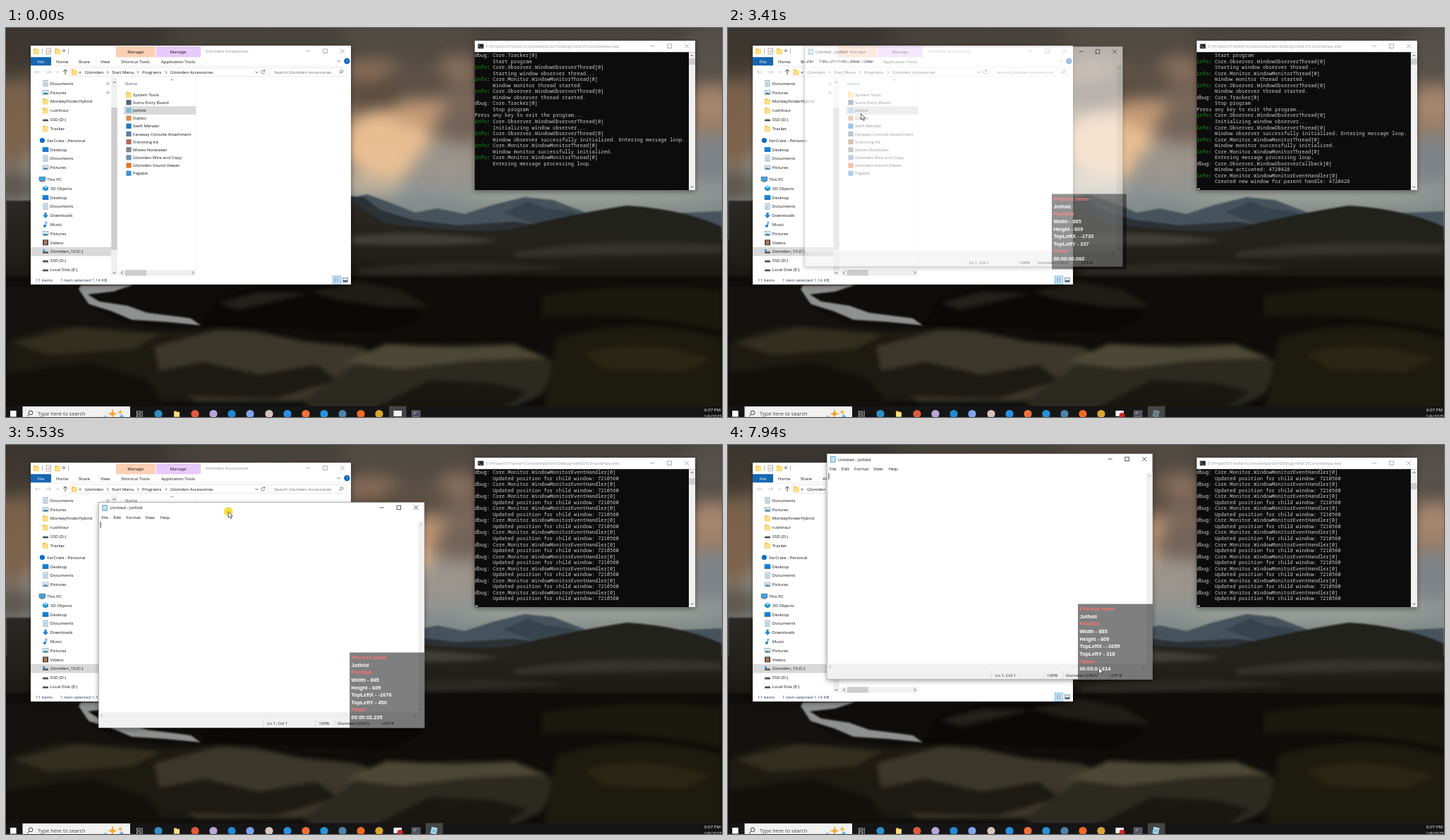
Animation of 1015 by 552 pixels, one loop 8000 ms. Source, as an HTML page:

```html
<!DOCTYPE html>
<html lang="en">
<head>
<meta charset="utf-8">
<title>Window tracker</title>
<style>
html, body { margin: 0; width: 100%; height: 100%; overflow: hidden; background: #0e0d0a; }
svg { display: block; width: 1015px; height: 552px; }
filter { color-interpolation-filters: sRGB; }
text { font-family: "Open Sans", "Noto Sans", sans-serif; white-space: pre; }
.mono text { font-family: "Noto Sans Mono", "DejaVu Sans Mono", monospace; }
.tag text { font-family: "Liberation Sans", Arial, sans-serif; font-weight: bold; }
</style>
</head>
<body>
<svg id="stage" viewBox="0 0 1015 552" xmlns="http://www.w3.org/2000/svg"></svg>
<script>
const LOOP = 8000, PX = 1.917;
const ROW_TOP = 94.5, ROW_STEP = 11.17, SELECTED = 2;

// Drawing helpers
const rect = (x, y, w, h, fill, more = '') =>
  `<rect x="${x}" y="${y}" width="${w}" height="${h}" fill="${fill}" ${more}/>`;
const disc = (x, y, r, fill, more = '') => `<circle cx="${x}" cy="${y}" r="${r}" fill="${fill}" ${more}/>`;
const shape = (d, fill, more = '') => `<path d="${d}" fill="${fill}" ${more}/>`;
const line = (d, stroke, width = .7, more = '') =>
  shape(d, 'none', `stroke="${stroke}" stroke-width="${width}" ${more}`);
const text = (x, y, str, fill = '#111', size = 6.1, more = '') =>
  `<text x="${x}" y="${(y + size * .36).toFixed(2)}" font-size="${size}" fill="${fill}" ${more}>${str}</text>`;
const mid = (x, y, str, fill, size) => text(x, y, str, fill, size, 'text-anchor="middle"');
const arrow = (x, y, turn, color = '#444') =>
  line('M-2 1L0 -1L2 1', color, .9, `transform="translate(${x} ${y}) rotate(${turn})"`);
const buttons = (x, y, color) =>
  line(`M${x - 3} ${y}h6`, color) +
  rect(x + 21.2, y - 2.8, 5.6, 5.6, 'none', `stroke="${color}" stroke-width=".7"`) +
  line(`M${x + 45.5} ${y - 3}l6 6m0 -6l-6 6`, color);

const icons = {
  folder: (x, y) => shape(`M${x - 4} ${y - 4}h3.5l1 1.2h3.5v7h-8z`, '#f3c550') +
    rect(x - 3.2, y - 2, 7.2, 5.8, '#ffdf85'),
  doc: (x, y) => rect(x - 3, y - 4, 6, 8, '#fff', 'stroke="#6f8799" stroke-width=".7"') +
    line(`M${x - 1.8} ${y - 1.5}h3.6m-3.6 1.8h3.6m-3.6 1.8h3.6`, '#3b8fc9'),
  pic: (x, y) => rect(x - 4, y - 3, 8, 6, '#d8ecf7', 'stroke="#7e94a3" stroke-width=".6"') +
    shape(`M${x - 3.6} ${y + 2.6}l2.6 -3 1.6 1.5 1.5 -1 1.5 2.5z`, '#3a7fa5'),
  disk: (x, y) => rect(x - 4, y, 8, 2.6, '#4c5054', 'rx=".6"') + rect(x - 3, y - .9, 6, 1, '#a9adb0'),
  osdisk: (x, y) => icons.disk(x, y) + rect(x - 4, y - 3, 3, 2.6, '#1e9be6'),
  desk: (x, y) => rect(x - 4.3, y - 3.2, 8.6, 6.4, '#1683d8') + rect(x - 4.3, y + 2, 8.6, 1.2, '#0b5aa5'),
  pc: (x, y) => rect(x - 4.3, y - 3.5, 8.6, 5.5, '#3aa5e8', 'stroke="#51697a" stroke-width=".7"') +
    rect(x - 3, y + 2.6, 6, 1.2, '#51697a'),
  cube: (x, y) => shape(`M${x - 4} ${y - 2}l4 -2 4 2v4l-4 2 -4 -2z`, '#2694cf') +
    shape(`M${x - 4} ${y - 2}l4 2 4 -2 -4 -2z`, '#8fd4f0'),
  down: (x, y) => shape(`M${x - 1.6} ${y - 4}h3.2v3.6h2.6l-4.2 4.4 -4.2 -4.4h2.6z`, '#1f87d8'),
  music: (x, y) => disc(x - 1.2, y + 2.2, 1.9, '#1d7fd1') + line(`M${x + .4} ${y + 2}v-6l2.4 2.4`, '#1d7fd1', 1),
  film: (x, y) => rect(x - 4, y - 4, 8, 8, '#3f4348') + rect(x - 2.4, y - 3, 4.8, 6, '#b3764f'),
  cloud: (x, y) => disc(x, y, 3.6, '#0f6cc4'),
};

// Landscape in broad soft tones
function landscape() {
  const blur = (id, body) => `<g filter="url(#${id})">${body}</g>`;
  const blob = (x, y, w, h, c) => `<ellipse cx="${x}" cy="${y}" rx="${w}" ry="${h}" fill="${c}" opacity=".9"/>`;
  const clouds = blob(110, 6, 170, 34, '#393530') + blob(370, 6, 150, 26, '#47423b') + blob(570, 10, 100, 30, '#544c43') +
    blob(640, 60, 30, 22, '#8a715c') + blob(520, 60, 40, 16, '#8d7159') + blob(520, 95, 40, 20, '#58493c') +
    blob(580, 75, 50, 18, '#594d42') + blob(540, 165, 62, 48, '#f2c595') + blob(590, 122, 46, 18, '#c79c77') +
    blob(645, 135, 34, 26, '#6f6158') + blob(625, 195, 50, 30, '#9c968e') + blob(520, 222, 45, 14, '#c5b59c') +
    blob(1000, 30, 42, 40, '#56514b') + blob(1000, 110, 30, 28, '#a98973') + blob(1000, 185, 32, 34, '#7c8288') +
    blob(820, 238, 180, 10, '#a0a69b') + blob(8, 40, 36, 34, '#40382f') + blob(8, 135, 36, 62, '#7b6049') +
    blob(8, 225, 36, 24, '#5a5148');
  return rect(0, 0, 1015, 300, 'url(#sky)') + blur('haze', clouds) + blur('soft',
    shape('M480 243L512 236 545 248 580 262 612 256 650 264 690 251 735 240 775 244 822 262 870 266 1015 260V310H480Z', '#46535c') +
    shape('M480 238L508 240 530 258 575 272 640 280 720 275 800 285V320H480Z', '#2b3135') +
    shape('M705 262L740 246 765 256 800 260 850 276 760 282Z', '#38444d') +
    shape('M690 292Q800 264 880 252Q960 257 1015 282V370H690Z', '#22221d') +
    shape('M0 245H488L535 276Q630 292 720 286L1015 304V380H0Z', 'url(#plain)') +
    rect(0, 352, 1015, 200, '#0e0d0a')) +
  blur('mist',
    shape('M490 296Q580 284 700 302Q620 312 490 306Z', '#403f37') +
    shape('M720 318Q850 296 1015 308V320Q860 322 720 326Z', '#34332a') +
    shape('M500 342Q640 322 800 340Q650 352 500 350Z', '#2a2922') +
    shape('M760 380Q880 360 1015 372V430Q880 400 760 410Z', '#1b190d')) +
  blur('soft',
    shape('M106 365L182 364 152 374 116 378 132 388 172 394 200 404 262 412 276 422 226 417 178 414 150 402 118 392 100 376Z', '#8f9190') +
    shape('M0 366H100L120 396 160 418 240 426 0 442Z', '#13120f') +
    shape('M276 422L300 384 370 366 470 362 560 384 590 410 540 432 400 426Z', '#0a0907')) +
  blur('mist',
    shape('M430 374L500 360 560 372 600 396 540 396 470 386Z', '#1f1d15') +
    shape('M300 390L360 374 430 376 390 386 330 400Z', '#24211a') +
    shape('M0 444L70 422 200 430 320 426 430 448 400 490 280 530 90 530 0 552Z', '#1d1a12') +
    shape('M210 452L300 428 352 430 420 444 500 452 560 478 520 515 410 530 270 530 220 500Z', '#3c372a') +
    shape('M10 446L100 424 220 434 180 456 60 464Z', '#332e1e') +
    shape('M200 490L280 474 360 492 440 478 470 500 380 526 250 522Z', '#1c1a13') +
    shape('M420 530L500 474 600 450 720 448 782 476 760 520 690 552H450Z', '#2c2a20') +
    shape('M480 474L540 448 640 454 720 450 768 468 660 472 560 484Z', '#4d4835') +
    shape('M520 540L600 500 690 504 740 516 690 552H530Z', '#191710') +
    shape('M780 440Q900 404 1015 440V552H760Z', '#1d1a0e') +
    shape('M820 462Q900 436 1000 470L960 488 850 484Z', '#2a2613') +
    shape('M0 490L120 474 200 500 240 552H0Z', '#12100b'));
}

function sidebar() {
  const entry = (y, kind, label, x = 56) => icons[kind](x, y) + text(x + 6.8, y, label);
  const rows = [
    [78.5, 'doc', 'Documents'], [91.3, 'pic', 'Pictures'], [104, 'folder', 'MonkeyFinderHybrid'],
    [117, 'folder', 'rushhour'], [129.7, 'disk', 'SSD (D:)'], [142.5, 'folder', 'Tracker'],
    [159.5, 'cloud', 'FarCrate - Personal', 51.4], [172.3, 'desk', 'Desktop'], [185, 'doc', 'Documents'],
    [198, 'pic', 'Pictures'], [214.7, 'pc', 'This PC', 51.4], [227.5, 'cube', '3D Objects'],
    [240.3, 'desk', 'Desktop'], [253.2, 'doc', 'Documents'], [266, 'down', 'Downloads'],
    [278.8, 'music', 'Music'], [291.6, 'pic', 'Pictures'], [304.4, 'film', 'Videos'],
    [317.2, 'osdisk', 'Glomden_10 (C:)'], [330, 'disk', 'SSD (D:)'], [342.7, 'disk', 'Local Disk (E:)'],
  ];
  const pin = y => line(`M142 ${y + 2.5}l2 -2m-1.5 -1.5l3 3m-1 -4l2 2l-2 1.5`, '#777');
  return rect(35, 311, 114, 12.6, '#d9d9d9') + rows.map(r => entry(...r)).join('') + pin(78.5) + pin(91.3) +
    rect(149.3, 71, 8.4, 280, '#f0f0f0') + rect(149.3, 113, 8.4, 202, '#cdcdcd') +
    arrow(153.5, 77, 0) + arrow(153.5, 347.5, 180);
}

function fileList() {
  const files = [['System Tools'], ['Sums Entry Board', '#54697c'], ['Jotfold', '#7cb9d8'], ['Dabbo', '#d98a4a'],
    ['Swift Mender', '#1878c8'], ['Faraway Console Attachment', '#5f7f9c'], ['Trimming Kit', '#b4685c'],
    ['Moves Notetaker', '#7a8590'], ['Glomden Wire and Copy', '#6f8fae'], ['Glomden Sound Viewer', '#e2762c'],
    ['PageJot', '#3f8fd0']];
  return files.map(([name, color], i) => {
    const y = ROW_TOP + i * ROW_STEP;
    return (color ? rect(170.4, y - 3.6, 7.2, 7.2, color) : icons.folder(174, y)) + text(180, y, name);
  }).join('');
}

function explorer() {
  const crumbs = [[112, 'Glomden'], [150, 'Start Menu'], [193, 'Programs'], [233, 'Glomden Accessories']];
  return rect(35, 25, 454, 339, '#fff', 'filter="url(#shadow)"') +
    icons.folder(43, 33) + line('M51.5 29v8M88.5 29v8', '#888', .6) +
    rect(57, 29, 6.6, 8, '#fff', 'stroke="#777" stroke-width=".6"') + line('M58.5 33l1.5 1.5 2.6 -3', '#d3552b', .9) +
    icons.folder(73, 33) + arrow(82, 33, 180) + line('M80 31h4', '#444') +
    rect(156, 26, 55.5, 15.5, '#fbcfb3') + rect(212.5, 26, 63.5, 15.5, '#e8cafa') +
    mid(183.7, 34, 'Manage') + mid(244, 34, 'Manage') +
    text(283, 33, 'Glomden Accessories', '#8c8c8c', 6.1, 'id="exTitle"') + buttons(428.5, 32.7, '#888') +
    rect(35, 41.3, 29, 12, '#1865b0') + mid(49.5, 47.3, 'File', '#fff') +
    [[79.7, 'Home'], [110.8, 'Share'], [140.7, 'View'], [183.5, 'Shortcut Tools'], [244, 'Application Tools']]
      .map(([x, s]) => mid(x, 47.3, s)).join('') +
    arrow(472, 47, 180, '#777') + disc(483.3, 47, 4.2, '#0f67b8') + mid(483.3, 47, '?', '#fff', 6) +
    line('M35 53.8H489', '#e2e2e2', .6) +
    line('M48.5 62.5h-7m2.8 -2.8l-2.8 2.8 2.8 2.8M56.5 62.5h7m-2.8 -2.8l2.8 2.8 -2.8 2.8', '#bbb', .8) +
    arrow(73, 62.5, 180, '#aaa') + line('M84 66v-7m-2.8 2.8l2.8 -2.8 2.8 2.8', '#333', .9) +
    rect(91, 56.5, 280.5, 12.3, '#fff', 'stroke="#d9d9d9" stroke-width=".6"') + icons.folder(97, 62.5) +
    text(103, 62, '«', '#333', 8) + crumbs.map(([x, s]) => text(x, 62.7, s)).join('') +
    [144, 187, 227].map(x => arrow(x, 62.8, 90, '#555')).join('') + arrow(355.5, 62.8, 180) +
    line('M366.6 61a2.6 2.6 0 1 0 .3 2.4M366.8 59v2.2h-2.2', '#444') +
    rect(375, 56.5, 107.5, 12.3, '#fff', 'stroke="#d9d9d9" stroke-width=".6"') +
    text(380, 62.7, 'Search Glomden Accessories', '#707070') +
    disc(475.8, 61.5, 2, 'none', 'stroke="#555" stroke-width=".7"') + line('M474.3 63l-2.3 2.3', '#555') +
    sidebar() + line('M269.3 71V343', '#ececec', .6) + text(169, 79, 'Name', '#43607f') + arrow(235.3, 73.5, 0, '#777') +
    '<rect id="hover" x="167" width="102" height="11.2" fill="#e5f3ff"/>' +
    `<rect id="selected" x="167.3" y="${ROW_TOP + SELECTED * ROW_STEP - 5.6}" width="101.6" height="11.2" stroke-width=".6"/>` +
    fileList() + rect(160, 343.3, 109.3, 8.2, '#f0f0f0') + rect(169, 343.3, 30, 8.2, '#cdcdcd') +
    arrow(164.5, 347.4, -90) + arrow(265, 347.4, 90) +
    text(42, 358, '11 items', '#1e395b') + text(77, 358, '1 item selected', '#1e395b') + text(122, 358, '1.14 KB', '#1e395b') +
    rect(463.3, 352, 11.5, 11, '#cce8ff', 'stroke="#4ba3e0" stroke-width=".7"') +
    line('M465.5 355h7m-7 2.4h7m-7 2.4h7', '#667', .8, 'stroke-dasharray="2.5 .8"') +
    rect(477.6, 354.5, 7, 6, '#d5e7f4', 'stroke="#667" stroke-width=".6"') + rect(478, 358, 6.2, 2.2, '#4e606e');
}

const consoleWindow = () => rect(664.5, 18, 312.5, 212, '#0c0c0c', 'filter="url(#shadow)"') +
  rect(664.5, 18, 312.5, 16.2, '#fff') + rect(669, 22.7, 8, 6.4, '#222', 'stroke="#999" stroke-width=".6"') +
  line('M670.3 24.5l1.4 1.2 -1.4 1.2m2.2 .6h2', '#ddd', .6) +
  text(680, 26, 'E:\\Projects\\Tracker\\ConsoleApp\\bin\\Debug\\net8.0\\ConsoleApp.exe', '#999', 6.1) +
  buttons(916.5, 25.7, '#888') + rect(968, 34.2, 9, 195.8, '#f0f0f0') +
  arrow(972.5, 39, 0) + arrow(972.5, 225.5, 180) +
  '<rect id="thumb" x="968.3" width="8.4" height="9" fill="#cdcdcd"/><g id="log" class="mono"></g>';

const editor = () => rect(0, 0, 462, 320, '#fff', 'filter="url(#shadow)"') +
  rect(.2, .2, 461.6, 319.6, '#fff', 'stroke="#777" stroke-width=".5"') +
  rect(5.5, 4, 7, 8, '#a9d8ee', 'stroke="#5b8da8" stroke-width=".6"') + line('M7 6.5h4m-4 2h4', '#fff') +
  text(16, 8, 'Untitled - Jotfold') + buttons(401.7, 7.6, '#111') +
  [[4, 'File'], [21, 'Edit'], [39, 'Format'], [66.3, 'View'], [87.5, 'Help']].map(([x, s]) => text(x, 21.2, s)).join('') +
  rect(453.3, 27, 8.4, 271, '#f0f0f0') + rect(.5, 298, 461, 9, '#f0f0f0') +
  arrow(457.3, 31.5, 0, '#aaa') + arrow(457.3, 294, 180, '#aaa') + arrow(4.5, 302.3, -90, '#aaa') + arrow(449, 302.3, 90, '#aaa') +
  rect(.5, 307.5, 461, 12.2, '#f0f0f0') + line('M233.5 308v11M308 308v11M335 308v11M399 308v11', '#d0d0d0', .6) +
  [[239, 'Ln 1, Col 1'], [312, '100%'], [338.5, 'Glomden (CRLF)'], [402, 'UTF-8']].map(([x, s]) => text(x, 314, s, '#222')).join('') +
  rect(2.5, 27.5, .8, 9, '#000', 'id="caret"');

const tagPanel = () => rect(356, 213.2, 106, 106.8, '#000', 'opacity=".5"') +
  ['Process name', 'Jotfold', 'Position', 'Width - 885', 'Height - 609', '', '', 'Timer:', ''].map((s, i) =>
    text(358.4, 220.2 + i * 10.62, s, [0, 2, 7].includes(i) ? '#ff7272' : '#fff', 7.4)).join('');

function taskbar() {
  const marks = [[216, '#2f8fc4'], [268, '#de5a3c'], [294, '#b9a6da'], [320, '#1f8ad2'], [346, '#7fa4ec'], [373, '#d8c4bd'],
    [399, '#2a8fe0'], [425, '#f0703a'], [451, '#2494dc'], [477, '#4d83a8'], [503, '#f06a24'], [529, '#d9a532']];
  const star = (x, y, r, c) => shape(`M${x} ${y - r}Q${x} ${y} ${x + r} ${y}Q${x} ${y} ${x} ${y + r}Q${x} ${y} ${x - r} ${y}Q${x} ${y} ${x} ${y - r}Z`,
    c, `stroke="${c}" stroke-width="1"`);
  return rect(0, 536.5, 1015, 15.5, '#151515') + rect(6, 543, 8.6, 8.6, '#fff') +
    rect(23.5, 537, 152.5, 15, '#f1f1f1') + disc(35, 546, 2.9, 'none', 'stroke="#333" stroke-width=".9"') +
    line('M33 548.2l-3 3', '#333', 1) + text(45, 547.5, 'Type here to search', '#444', 7.4) +
    star(151, 547.5, 6, '#f3a62c') + star(162, 545, 3, '#f0b64d') + star(164, 551, 2.5, '#59a7e0') + star(141, 552, 2.5, '#8bbde4') +
    rect(185.5, 544, 5, 3, 'none', 'stroke="#ddd" stroke-width=".8"') + rect(185.5, 549, 5, 3, 'none', 'stroke="#ddd" stroke-width=".8"') +
    line('M193 543v9', '#ddd', .9) + '<rect id="active" y="536.5" width="24.5" height="15.5" fill="#454545"/>' +
    icons.folder(242, 547.5) + marks.map(([x, c]) => disc(x, 547.5, 5.6, c)).join('') +
    rect(549.5, 543, 11.5, 8, '#f2f2f2') + disc(558.6, 549.8, 3.9, '#d3232a', 'id="rec"') +
    rect(575.5, 543, 11.5, 8.5, '#4c505c', 'stroke="#8a8e99" stroke-width=".6"') + line('M577.5 545.5h5m-5 2h3', '#ccc') +
    '<g id="noteIcon">' + rect(602.5, 542.5, 8.5, 9.5, '#a9d8ee', 'transform="rotate(12 607 547)"') +
    line('M604.5 546l5 1m-5.5 1.2l5 1', '#4d8dad', .8) + '</g>' +
    mid(1001.5, 542, '6:07 PM', '#fff', 6.1) + mid(1002, 551, '1/9/2025', '#fff', 6.1);
}

const grad = (id, stops) => `<linearGradient id="${id}" x2="0" y2="1">` +
  stops.map(([o, c]) => `<stop offset="${o}" stop-color="${c}"/>`).join('') + '</linearGradient>';
const softener = (id, n) => `<filter id="${id}" x="-20%" y="-30%" width="140%" height="160%"><feGaussianBlur stdDeviation="${n}"/></filter>`;

document.getElementById('stage').innerHTML = '<defs>' +
  grad('sky', [[0, '#46413b'], [.18, '#5a5048'], [.45, '#917a66'], [.75, '#8f9494'], [1, '#74807f']]) +
  grad('plain', [[0, '#2a2925'], [.6, '#201f19'], [1, '#100f0c']]) +
  softener('haze', 11) + softener('mist', 3) + softener('soft', .8) +
  '<filter id="shadow"><feDropShadow dx="0" dy="2" stdDeviation="3.5" flood-opacity=".4"/></filter></defs>' +
  landscape() + explorer() + consoleWindow() + `<g id="editor">${editor()}</g><g id="tag" class="tag">${tagPanel()}</g>` + taskbar() +
  '<g id="pointer"><circle id="press" r="6.4" fill="#f4d917" opacity=".82"/>' +
  shape('M0 0V8.6L2 6.8 3.4 10 4.9 9.4 3.5 6.3H6.2Z', '#fff', 'stroke="#111" stroke-width=".65"') + '</g>';

const $ = id => document.getElementById(id);
const set = (id, attrs) => { for (const k in attrs) $(id).setAttribute(k, attrs[k]); };
const show = (id, on) => set(id, { visibility: on ? 'visible' : 'hidden' });
const tagLines = $('tag').querySelectorAll('text');

// Keys are [time, value, value...]
function span(keys, t) {
  const i = keys.findIndex(k => k[0] > t);
  return i < 0 ? keys.length - 1 : Math.max(1, i);
}
function linear(keys, t) {
  const i = span(keys, t), [t0, a] = keys[i - 1], [t1, b] = keys[i];
  return a + (b - a) * Math.min(1, Math.max(0, (t - t0) / (t1 - t0)));
}
// A curve that flows through its keys, resting only at turns and ends
function glide(keys, t) {
  const i = span(keys, t), a = keys[i - 1], b = keys[i], dt = b[0] - a[0];
  const u = Math.min(1, Math.max(0, (t - a[0]) / dt));
  const pace = (j, n) => (keys[j + 1][n] - keys[j][n]) / (keys[j + 1][0] - keys[j][0]);
  const slope = (j, n) => {
    if (j === 0 || j === keys.length - 1) return 0;
    const p = pace(j - 1, n), q = pace(j, n);
    return p * q > 0 ? 2 * p * q / (p + q) : 0;
  };
  return a.slice(1).map((v, k) => {
    const n = k + 1, ease = u * u * (3 - 2 * u);
    return v + (b[n] - v) * ease + dt * u * (1 - u) * ((1 - u) * slope(i - 1, n) - u * slope(i, n));
  });
}

const OPEN = 3410, GRAB = 4710, DROP = 7140;
const winPath = [[GRAB, -1730, 337], [5530, -1676, 450], [5680, -1669, 468], [6060, -1658, 390],
  [6430, -1655, 460], [6740, -1655, 311], [6840, -1655, 315], [7000, -1659, 318]];
const approach = [[450, 1040, 548], [500, 976, 541], [1300, 192, 169.5], [1700, 188.5, 121.5],
  [3850, 188.5, 121.5], [4410, 287.5, 41.5], [GRAB, 287, 35.5]];
const leave = [[DROP, 325, 26], [7340, 340, 46], [7840, 527, 320], [7940, 525.5, 316]];
const clock = [[3350, 0], [OPEN, 60], [4410, 1098], [5530, 2235], [6840, 3508], [7940, 4614]];
const fade = [[3320, 0], [OPEN, .57], [3510, .95], [3610, 1]];
const thumb = [[GRAB, 43], [5530, 47.2], [6840, 54]];

const OBS = 'info: Core.Observer.WindowObserverThread[0]', MON = 'info: Core.Monitor.WindowMonitorThread[0]';
const startLog = ['dbug: Core.Tracker[0]', ' Start program', OBS, ' Starting window observer thread...',
  MON, ' Window monitor thread started.', OBS, ' Window observer thread started.', 'dbug: Core.Tracker[0]', ' Stop program',
  'Press any key to exit the program...', OBS, ' Initializing window observer...',
  OBS, ' Window observer successfully initialized. Entering message loop.',
  MON, ' Window monitor successfully initialized.', MON, ' Entering message processing loop.'];
const openLog = [...startLog, 'dbug: Core.Observer.WindowObserverCallback[0]', ' Window activated: 4720428',
  'info: Core.Monitor.WindowMonitorEventHandler[0]', ' Created new window for parent handle: 4720428'];
const moveLog = Array(11).fill(['dbug: Core.Monitor.WindowMonitorEventHandler[0]',
  ' Updated position for child window: 7210560']).flat();

let shownLog;
function drawLog(lines) {
  if (lines === shownLog) return;
  shownLog = lines;
  $('log').innerHTML = lines.slice(-22).map((s, i) => {
    const body = s.trim().replace(/^info/, '<tspan fill="#13a10e">info</tspan>');
    return text(s[0] === ' ' ? 690 : 664.5, 38.6 + i * 8.53, body, '#ccc', 7.1);
  }).join('') + (lines.length >= 22 ? rect(664.8, 227.8, 4.2, 1.4, '#ddd') : '');
}

function tick(t) {
  const base = [0, OPEN, 4820, 5530, 5640, 6540].filter(b => b <= t).pop();
  return base + Math.floor((t - base) / 100) * 100;
}

function draw(time) {
  const t = tick(time), opened = t >= OPEN;
  const [wx, wy] = glide(winPath, t);
  const x = 103 + (wx + 1730) / PX, y = 22.3 + (wy - 337) / PX;
  const alpha = linear(fade, t);
  const s = .945 + .055 * alpha;
  set('editor', { opacity: alpha, transform: `translate(${x + 231 * (1 - s)} ${y + 160 * (1 - s)}) scale(${s})` });
  show('editor', opened);
  set('tag', { transform: `translate(${x} ${y})`, opacity: t < 3500 ? .85 : 1 });
  show('tag', opened);
  show('caret', t >= 3600 && t % 1060 >= 200 && t % 1060 < 730);

  const ms = String(Math.round(linear(clock, t))).padStart(4, '0');
  tagLines[5].textContent = 'TopLeftX - ' + Math.round(wx);
  tagLines[6].textContent = 'TopLeftY - ' + Math.round(wy);
  tagLines[8].textContent = `00:00:0${ms[0]}.${ms.slice(1)}`;

  const dragging = t > GRAB && t <= DROP;
  const [cx, cy] = dragging ? [x + 184, y + 13.2] : glide(t > DROP ? leave : approach, t);
  set('pointer', { transform: `translate(${cx} ${cy})` });
  show('pointer', t >= 500);
  const clicking = t >= 3100 && t < 3300;
  show('press', dragging || clicking);

  const row = t >= 500 && !opened && cx > 167 && cx < 269 ? Math.floor((cy - ROW_TOP) / ROW_STEP + .5) : -1;
  const lit = row === SELECTED;
  set('hover', { y: ROW_TOP + row * ROW_STEP - 5.6 });
  show('hover', row >= 0 && row < 11 && !lit);
  set('selected', { fill: lit ? '#cce8ff' : '#d9d9d9', stroke: lit ? '#99d1ff' : '#d9d9d9' });

  const browsing = t >= 3100 && !opened;
  set('exTitle', { fill: browsing ? '#222' : '#8c8c8c' });
  set('active', { x: opened ? 595 : browsing ? 230 : 543 });
  show('rec', t >= 100);
  show('noteIcon', opened);
  set('noteIcon', { opacity: t < 3500 ? .45 : 1 });
  set('thumb', { y: linear(thumb, t) });
  drawLog(t > GRAB + 100 ? moveLog : opened ? openLog : startLog);
}

const start = performance.now();
function frame() {
  draw((performance.now() - start) % LOOP);
  requestAnimationFrame(frame);
}
frame();
</script>
</body>
</html>
```
